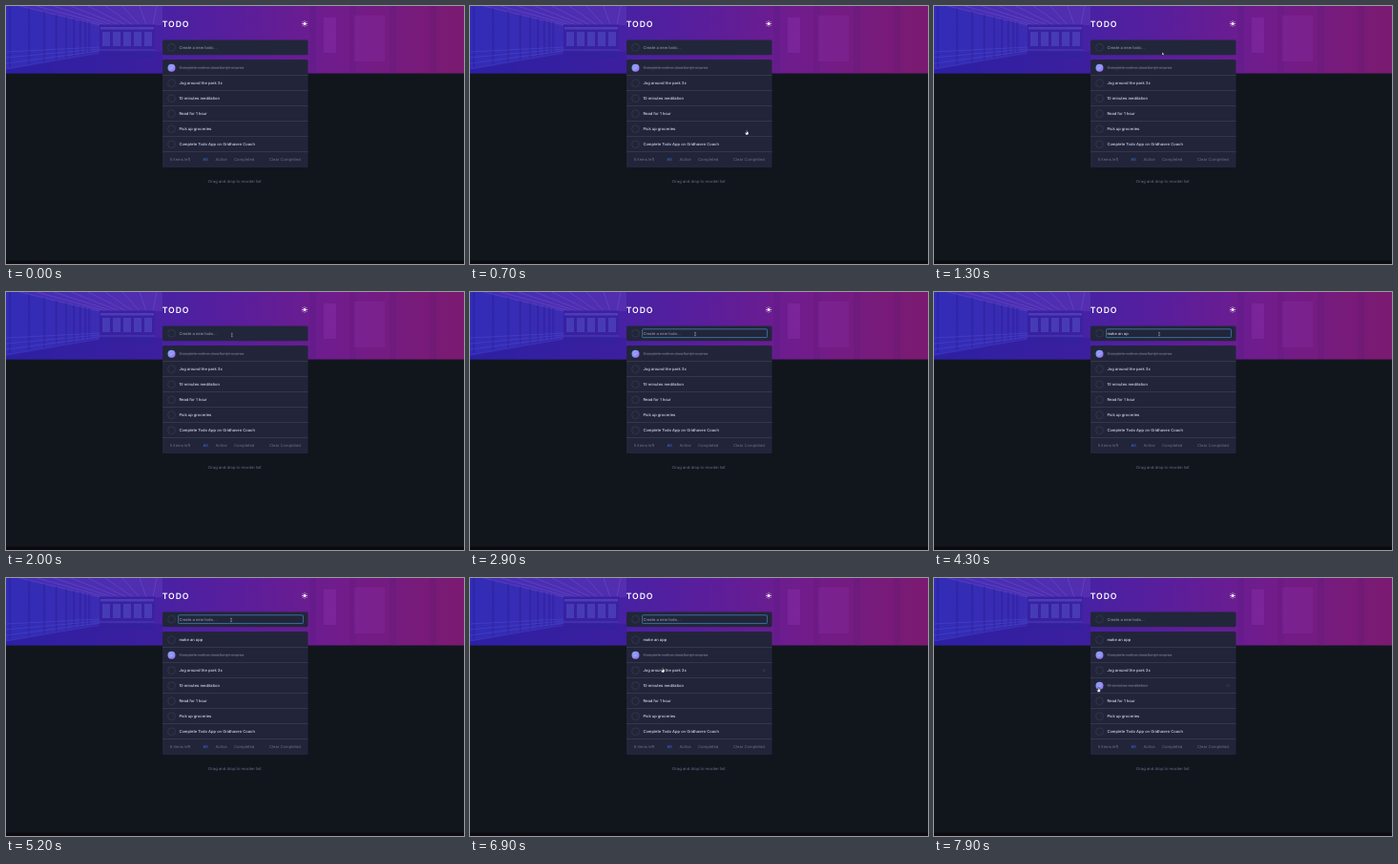
An HTML page for the animation above (8000 ms loop, 480 by 270 pixels).

```html
<!DOCTYPE html>
<html lang="en">
<head>
<meta charset="utf-8">
<title>Todo</title>
<style>
  html, body { margin: 0; width: 100%; height: 100%; overflow: hidden; background: #11161d; }
  svg { display: block; width: 100vw; height: 100vh; }
  text { font: 500 4.08px Inter, "Open Sans", sans-serif; fill: #d5d7ea; text-rendering: geometricPrecision; }
  .title { font-size: 8.7px; font-weight: 600; letter-spacing: .9px; fill: #fff; }
  .small { font-size: 4.15px; font-weight: 400; fill: #6c6f86; }
  .active { fill: #3a6fd0; font-weight: 500; }
  .done { fill: #666980; text-decoration: line-through; }
  .ring { fill: none; stroke: #3d4056; stroke-width: .6; }
  .line { stroke: #414359; stroke-width: .6; }
  .cross { stroke: #44475f; stroke-width: .5; }
  .pointer { fill: #fff; stroke: #10121a; stroke-width: .5; }
</style>
</head>
<body>
<svg id="stage" viewBox="0 0 480 270">
  <defs>
    <linearGradient id="sky">
      <stop offset="0" stop-color="#2b22ae"/>
      <stop offset=".3" stop-color="#4422a5"/>
      <stop offset=".5" stop-color="#591e9c"/>
      <stop offset=".72" stop-color="#711c8c"/>
      <stop offset="1" stop-color="#7b1a70"/>
    </linearGradient>
    <linearGradient id="tick" x2="1" y2="1">
      <stop offset="0" stop-color="#7bb0fa"/>
      <stop offset="1" stop-color="#a46df0"/>
    </linearGradient>
    <clipPath id="bannerClip"><rect width="480" height="70.5"/></clipPath>
  </defs>
  <g id="banner" clip-path="url(#bannerClip)"></g>
  <rect y="266.5" width="480" height="3.5" fill="#0d0b10"/>
  <text class="title" x="163.7" y="21.8">TODO</text>
  <g id="sun" stroke="#fff" stroke-width=".75"></g>
  <rect x="164" y="35.5" width="152.5" height="15.8" rx="1.5" fill="#22263a"/>
  <circle class="ring" cx="173.5" cy="43.3" r="3.9"/>
  <rect id="focus" x="180.6" y="38.8" width="130.8" height="8.8" rx=".7" fill="#22263a" stroke="#427fae" stroke-width=".8"/>
  <text id="entry" x="181.4" y="44.6"></text>
  <g id="list"></g>
  <g id="cursor"></g>
</svg>
<script>
const LOOP = 8000, ADD = 5200, CHECK = 7500, ROW = 16;
const $ = id => document.getElementById(id);
const tasks = [
  'Complete online JavaScript course', 'Jog around the park 3x', '10 minutes meditation',
  'Read for 1 hour', 'Pick up groceries', 'Complete Todo App on Gridhaven Coach'
];
const keyTimes = [3400, 3500, 3600, 3700, 3800, 3900, 4100, 4200, 4200, 4300, 4900];
const path = [[700, 290, 130], [1200, 239, 48], [1600, 239, 48], [2200, 236, 44],
  [6000, 236, 44], [6700, 202, 94], [7050, 202, 94], [7400, 172.5, 114.5]];

const line = (x1, y1, x2, y2, attrs = '') =>
  `<line x1="${x1}" y1="${y1}" x2="${x2}" y2="${y2}" ${attrs}/>`;
const rect = (x, y, w, h, fill, opacity = 1) =>
  `<rect x="${x}" y="${y}" width="${w}" height="${h}" fill="${fill}" opacity="${opacity}"/>`;
const label = (x, y, value, cls = '', anchor = 'start') =>
  `<text x="${x}" y="${y}" class="${cls}" text-anchor="${anchor}">${value}</text>`;
const setHtml = (node, html) => {
  if (node.shown !== html) node.innerHTML = node.shown = html;
};

function drawBanner() {
  let out = rect(0, 0, 480, 71, 'url(#sky)');
  // ceiling, side wall and floor of a corridor
  out += '<path d="M14 0H164V20H98Z" fill="#6a45c4" opacity=".35"/>';
  out += '<path d="M0 0H14L98 20V48L0 66Z" fill="#3e3cc4" opacity=".4"/>';
  out += '<path d="M0 66L98 48H164V71H0Z" fill="#301c98" opacity=".45"/>';
  for (let i = 0; i < 9; i++) {
    const x = 4 + 100 * (1 - .8 ** i);
    out += line(x, Math.max(0, x * .23 - 3), x, 65 - x * .18, 'stroke="#2a1f98" stroke-width="2.2" opacity=".45"');
    out += line(14 + i * 18, 0, 98 + i * 7, 20, 'stroke="#8b6bdc" stroke-width="1" opacity=".28"');
  }
  for (let i = 0; i < 4; i++)
    out += line(0, 48 + i * 6, 98, 43 + i * 2, 'stroke="#5360dc" stroke-width=".9" opacity=".35"');
  // lit windows at the far end
  out += rect(98, 19, 58, 35, '#30229c', .5);
  for (let i = 0; i < 5; i++) out += rect(101 + i * 11, 27, 8, 15, '#5952cc', .5);
  out += rect(99, 22, 56, 2.5, '#7462d6', .4) + rect(98, 45, 58, 2, '#5b49c4', .35);
  // panelled wall on the right
  for (let i = 0; i < 4; i++)
    out += rect(318 + i * 42, 0, 7, 71, '#4d1474', .15);
  out += rect(333, 12, 13, 37, '#8d35b0', .35) + rect(365, 10, 32, 48, '#8a2fa6', .3);
  $('banner').innerHTML = out;
}

function drawSun() {
  let out = '<circle cx="313" cy="18.5" r="1.6" fill="#fff" stroke="none"/>';
  for (let i = 0; i < 8; i++)
    out += line(2.2, 0, 3.1, 0, `transform="translate(313 18.5) rotate(${i * 45})"`);
  $('sun').innerHTML = out;
}

function drawList(t, hoverY) {
  const added = t >= ADD;
  const items = added ? ['make an app', ...tasks] : tasks;
  const checked = name => name === tasks[0] || (name === tasks[2] && t >= CHECK);
  const foot = 56 + items.length * ROW;
  let out = `<rect x="164" y="56" width="152.5" height="${items.length * ROW + 17}" rx="1.5" fill="#22253a"/>`;
  items.forEach((name, i) => {
    const top = 56 + i * ROW, mid = top + 8.7, done = checked(name);
    out += done
      ? `<circle cx="173.5" cy="${mid}" r="4" fill="url(#tick)"/>` +
        `<path d="M171.9 ${mid}l1.1 1.1 2-2.2" fill="none" stroke="#d9dcff" stroke-width=".5"/>`
      : `<circle class="ring" cx="173.5" cy="${mid}" r="3.9"/>`;
    out += label(181.4, mid + 1.4, name, done ? 'done' : '');
    out += line(164, top + 16.5, 316.5, top + 16.5, 'class="line"');
    if (hoverY >= top && hoverY < top + ROW)
      out += `<path class="cross" d="M306.5 ${mid - 1.5}l3 3m0-3l-3 3"/>`;
  });
  const left = items.filter(name => !checked(name)).length, base = foot + 10.1;
  out += label(171.7, base, `${left} items left`, 'small') + label(206.5, base, 'All', 'small active') +
    label(219.5, base, 'Active', 'small') + label(239, base, 'Completed', 'small') +
    label(308.9, base, 'Clear Completed', 'small', 'end');
  out += label(240, foot + 33.4, 'Drag and drop to reorder list', 'small', 'middle');
  setHtml($('list'), out);
}

function cursorAt(t) {
  const next = path.findIndex(p => p[0] > t);
  if (next < 0) return path[path.length - 1].slice(1);
  if (!next) return null;
  const [t0, x0, y0] = path[next - 1], [t1, x1, y1] = path[next];
  const p = (t - t0) / (t1 - t0), e = p * p * (3 - 2 * p);
  return [x0 + (x1 - x0) * e, y0 + (y1 - y0) * e];
}

function drawCursor(pos) {
  if (!pos) return setHtml($('cursor'), '');
  const [x, y] = pos;
  const shape = y > 38 && y < 47.6
    ? '<path d="M-.8-1.7H.8M0-1.7V1.7M-.8 1.7H.8" fill="none" stroke="#b4b7c8" stroke-width=".5"/>'
    : y > 56
      ? '<path class="pointer" d="M-.5 0Q0-.6.5 0V1.6L2 2V3.6L1.2 5H-.8L-2 2.8-1.5 2.3-.5 3Z"/>'
      : '<path class="pointer" d="M0 0V3.6L.9 2.9 1.5 4.1 2 3.8 1.5 2.7H2.6Z"/>';
  setHtml($('cursor'), shape);
  $('cursor').setAttribute('transform', `translate(${x} ${y})`);
}

function render(t) {
  const pos = cursorAt(t);
  const typed = t < ADD ? 'make an app'.slice(0, keyTimes.filter(k => k <= t).length) : '';
  $('entry').textContent = typed || 'Create a new todo...';
  $('entry').style.fill = typed ? '#c9cce2' : '#8f93a9';
  $('focus').style.display = t >= 2500 && t < CHECK ? '' : 'none';
  drawList(t, pos && t > 6000 ? pos[1] : -1);
  drawCursor(pos);
}

drawBanner();
drawSun();
const start = performance.now();
function tick() {
  render((performance.now() - start) % LOOP);
  requestAnimationFrame(tick);
}
tick();
</script>
</body>
</html>
```
